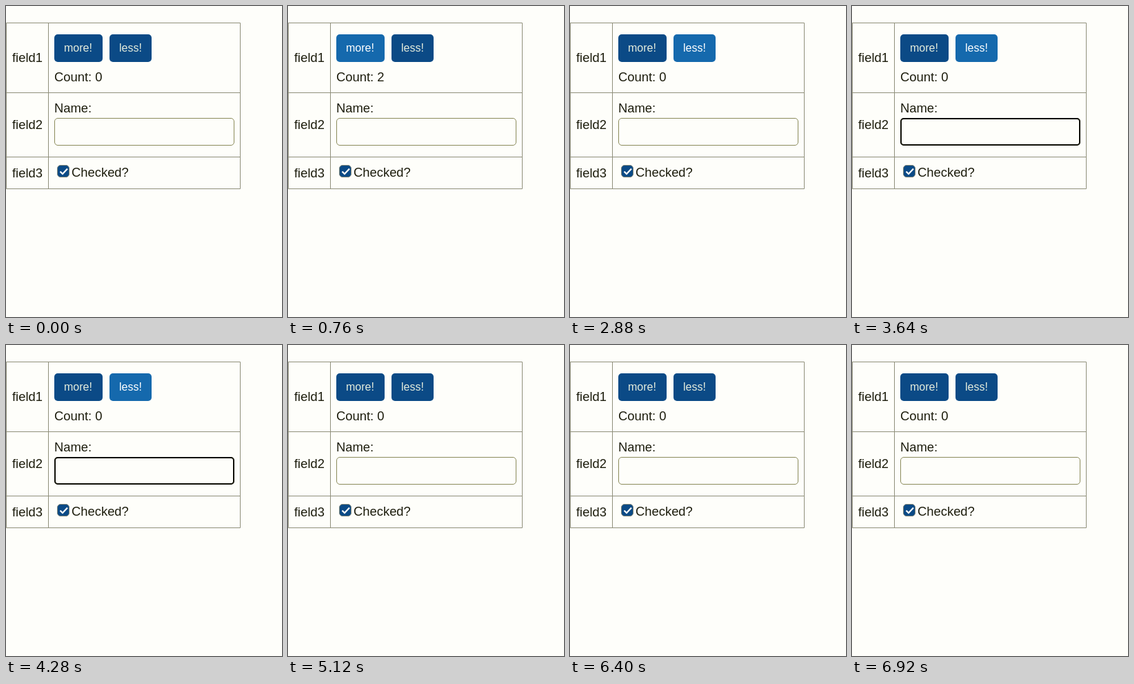
An HTML page that plays this animation: 400x450 px, repeating every 6960 ms.

```html
<!DOCTYPE html>
<html lang="en">
<head>
<meta charset="utf-8">
<title>Form fields</title>
<style>
  html, body { margin: 0; width: 100%; height: 100%; overflow: hidden; background: #fefefa; }
  svg { display: block; }
  text { font: 18.4px "Liberation Sans", Arial, sans-serif; fill: #1c1c0c; }
  .button rect { fill: #0b4a86; }
  .button text { font-size: 16px; fill: #e4ecdc; }
  .button.hover rect { fill: #1569ad; }
  .button.hover text { fill: #fff; }
  .grid { fill: none; stroke: #90907c; }
  #input { fill: none; stroke: #8c8c5c; }
  #focus { fill: none; stroke: #101008; stroke-width: 2; }
</style>
</head>
<body>
<svg width="400" height="450" viewBox="0 0 400 450">
  <path class="grid" d="M.5 24.5H339.5V264.5H.5ZM61.5 24.5V264.5M.5 125.5H339.5M.5 218.5H339.5"/>
  <text x="9" y="81">field1</text>
  <text x="9" y="178">field2</text>
  <text x="9" y="248">field3</text>

  <g class="button" id="more">
    <rect x="70" y="41" width="70" height="40" rx="5"/>
    <text x="84" y="66">more!</text>
  </g>
  <g class="button" id="less">
    <rect x="150" y="41" width="61" height="40" rx="5"/>
    <text x="164" y="66">less!</text>
  </g>
  <text x="70" y="109" id="count">Count: 0</text>

  <text x="70" y="154">Name:</text>
  <rect id="input" x="70.5" y="162.5" width="260" height="39" rx="4.5"/>
  <rect id="focus" x="71" y="163" width="259" height="38" rx="4"/>

  <rect x="74.5" y="230.5" width="17" height="17" rx="4.5" fill="#0b4a86" stroke="#7c8478"/>
  <path d="M78.5 239.5L82 243L89 235.5" fill="none" stroke="#fff" stroke-width="2.2"/>
  <text x="95" y="247">Checked?</text>
</svg>
<script>
  const LOOP = 6960;
  const $ = id => document.getElementById(id);
  const within = (t, from, to) => t >= from && t < to;

  // Each click changes the counter at its time.
  const clicks = [[400, 1], [640, 1], [2200, -1], [2560, -1]];

  function draw(t) {
    const count = clicks.reduce((sum, [at, step]) => sum + (t >= at ? step : 0), 0);
    $("count").textContent = "Count: " + count;
    $("more").classList.toggle("hover", within(t, 200, 1480));
    $("less").classList.toggle("hover", within(t, 1480, 4880));
    $("focus").style.display = within(t, 3320, 5080) ? "" : "none";
  }

  const start = performance.now();
  function tick() {
    draw((performance.now() - start) % LOOP);
    requestAnimationFrame(tick);
  }
  tick();
</script>
</body>
</html>
```
